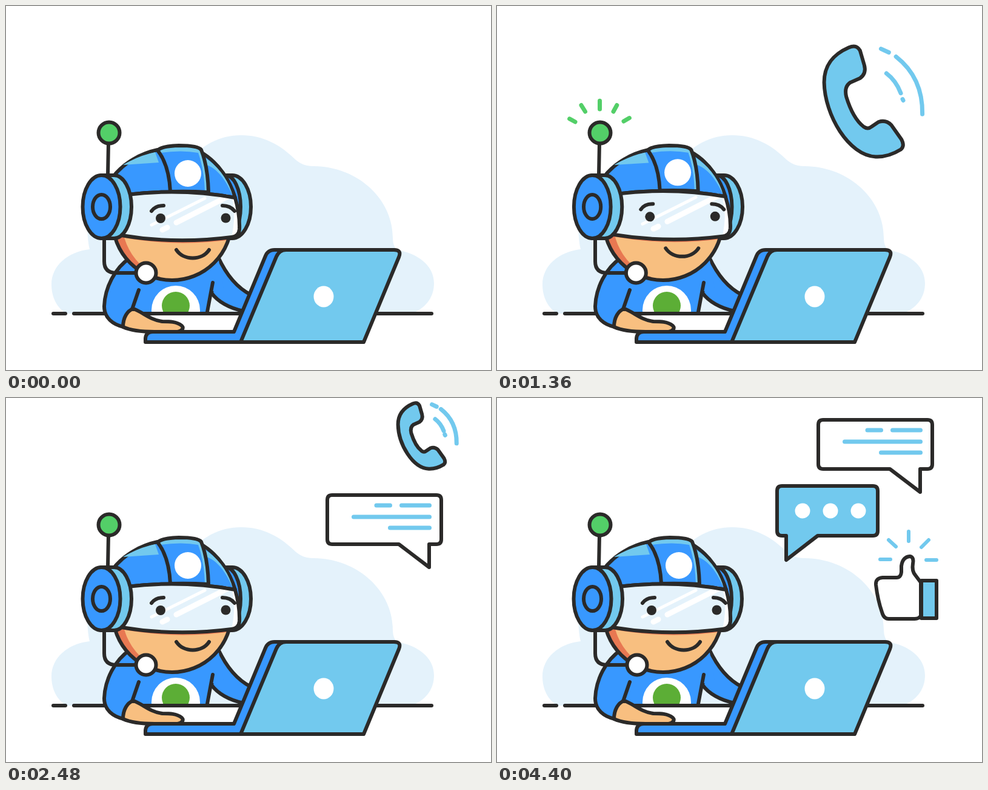
These frames come from a looping animation (800 px wide and 600 px high, 4.6 s). An HTML page:

```html
<!DOCTYPE html>
<html lang="en">
<head>
<meta charset="utf-8">
<title>Support call</title>
<style>
html, body { margin: 0; width: 100%; height: 100%; overflow: hidden; background: #fff; }
svg { display: block; width: 100%; height: 100%; }
.ink { stroke: #2b2a29; stroke-width: 6; stroke-linecap: round; stroke-linejoin: round; }
.none { fill: none; }
.white { fill: #fff; }
.blue { fill: #3898ff; }
.sky { fill: #72c9ee; }
.pale { fill: #e4f2fb; }
.skin { fill: #f8bf80; }
.shade { fill: #e87852; }
.dark { fill: #2b2a29; }
.green { fill: #53cf68; }
.line { fill: none; stroke: #72c9ee; stroke-width: 7; stroke-linecap: round; }
.shine { fill: none; stroke: #fff; stroke-linecap: round; }
#phone path { vector-effect: non-scaling-stroke; }
</style>
</head>
<body>
<svg viewBox="0 0 800 600">
  <defs>
    <clipPath id="faceClip"><circle cx="274" cy="354" r="98"/></clipPath>
    <clipPath id="deskClip"><path d="M200 440H360V504H200Z"/></clipPath>
  </defs>

  <path class="pale" d="M100 507C84 498 75 480 75 459C75 428 102 405 138 401C135 390 134 370 134 360C160 330 260 290 300 260C318 232 350 213 388 213C424 213 452 229 474 250C483 259 493 264 506 264C580 264 638 318 638 382Q638 396 645 402C680 408 706 428 706 457C706 482 690 500 668 507Z"/>
  <path class="ink none" d="M78 507H98M112 507H702"/>

  <g id="body">
    <path class="ink blue" d="M350 414C362 440 378 463 404 476L392 503C368 498 349 487 339 473Z"/>
    <path class="blue" d="M206 414H350L360 470L341 470L332 507H205Z"/>
    <path class="ink blue" d="M205 415C179 432 163 465 162 495C162 514 176 525 194 529L209 497L219 468"/>
    <path class="ink none" d="M341 456L332 504"/>
    <g clip-path="url(#deskClip)">
      <circle class="white" cx="280" cy="501" r="40"/>
      <circle cx="280" cy="494" r="23" fill="#5cae36"/>
    </g>
    <path class="white" d="M215 507H388L376 537H215Z"/>
    <path class="ink none" d="M222 507H388"/>
    <path class="ink skin" d="M210 499C200 502 193 514 193 529C206 535 225 537 245 537H283C290 536 294 531 290 527C281 520 270 520 258 520C238 518 225 504 210 499Z"/>
  </g>

  <g id="laptop">
    <path class="ink blue" d="M230 554V548Q231 537 242 537H376L428 412Q432 402 443 402H465L400 554Z"/>
    <path class="ink sky" d="M387 554L446 413Q451 402 462 402H640Q653 402 648 414L590 554Z"/>
    <ellipse class="white" cx="524" cy="479" rx="16.5" ry="17.5"/>
  </g>

  <g id="head">
    <path class="ink sky" d="M365 279H373A31 52 0 0 1 373 383H365Z" data-up="M365 279H383A29 52 0 0 1 383 383H365Z"/>
    <path class="ink blue" d="M362 279A25 52 0 0 1 362 383Z" data-up="M364 279A27 52 0 0 1 364 383Z"/>
    <circle class="shade" cx="274" cy="354" r="98"/>
    <g clip-path="url(#faceClip)">
      <circle class="skin" cx="290" cy="355" r="98.5"/>
      <path class="shade" d="M190 381Q280 398 372 385L372 360L190 360Z" data-up="M190 370Q280 384 369 376L369 350L190 350Z"/>
    </g>
    <circle class="ink none" cx="274" cy="354" r="98"/>

    <path class="ink blue" d="M176 282C195 258 222 243 250 237L320 240C352 258 370 290 378 316Q290 300 200 311Z" data-up="M176 282C193 260 218 246 242 239L312 240C345 255 362 275 370 301Q280 287 190 300Z"/>
    <path class="sky" d="M193 262Q220 246 246 241L252 258Z" data-up="M195 262Q215 249 232 244L239 262Z"/>
    <path class="sky" d="M328 250C352 265 368 290 374 313C362 285 348 268 331 262Z" data-up="M314 243C343 256 360 276 366 298C355 280 335 262 316 258Z"/>
    <path class="sky" d="M250 238Q256 231 285 230Q317 230 322 237Q333 265 334 307Q302 305 271 306Q269 262 250 238Z" data-up="M240 236Q246 230 275 230Q304 230 309 238Q317 262 316 293Q284 292 253 293Q252 258 240 236Z"/>
    <path class="blue" d="M254 242Q290 237 317 242Q327 270 328 306Q300 304 271 306Q268 262 254 242Z" data-up="M244 241Q280 235 305 241Q311 262 311 293Q284 292 253 293Q252 258 244 241Z"/>
    <path class="ink none" d="M250 238Q256 231 285 230Q317 230 322 237Q333 265 334 307Q302 305 271 306Q269 262 250 238Z" data-up="M240 236Q246 230 275 230Q304 230 309 238Q317 262 316 293Q284 292 253 293Q252 258 240 236Z"/>
    <g id="badge"><circle class="white" cx="300" cy="276" r="22"/></g>

    <path class="pale" d="M200 311Q290 300 378 316Q386 345 385 368Q384 380 372 381Q280 393 190 378Z" data-up="M190 300Q280 287 368 300Q385 330 384 356Q383 370 369 371Q280 379 190 366Z"/>
    <path class="white" d="M373 318L378 316Q386 345 385 368Q384 380 372 381Q380 345 373 318Z" data-up="M361 301L368 300Q385 330 384 356Q383 370 369 371Q380 335 361 301Z"/>
    <g id="shine">
      <path class="shine" stroke-width="5" d="M240 361L328 317"/>
      <path class="shine" stroke-width="9" d="M281 357L364 315M258 369L266 365"/>
    </g>
    <path class="ink none" d="M200 311Q290 300 378 316Q386 345 385 368Q384 380 372 381Q280 393 190 378Z" data-up="M190 300Q280 287 368 300Q385 330 384 356Q383 370 369 371Q280 379 190 366Z"/>

    <g id="face">
      <circle class="dark" cx="255" cy="350" r="8"/>
      <circle class="dark" cx="362.5" cy="349.5" r="8"/>
      <path class="ink none" d="M240 338Q246 329 260 329M357 329Q370 329 377 338"/>
      <path id="mouth" class="ink white"/>
    </g>

    <path class="ink none" d="M169 224L168 278"/>
    <g id="rays" fill="none" stroke="#53cf68" stroke-width="7" stroke-linecap="round"></g>
    <circle class="ink green" cx="170" cy="209" r="17.5"/>

    <path class="ink none" d="M162 383V421Q162 440 182 440H215"/>
    <g id="mic"><circle class="ink white" cx="231" cy="440" r="16.5"/></g>
    <path class="ink sky" d="M157 279H178A29 52 0 0 1 178 383H157Z" data-up="M155 279H175A26 52 0 0 1 175 383H155Z"/>
    <path class="ink blue" d="M157.5 279A31 52 0 0 1 157.5 383A31 52 0 0 1 157.5 279Z" data-up="M155.5 279A26 52 0 0 1 155.5 383A26 52 0 0 1 155.5 279Z"/>
    <path class="ink none" d="M157.5 311A14.5 20 0 0 1 157.5 351A14.5 20 0 0 1 157.5 311Z" data-up="M154.5 311A11.5 20 0 0 1 154.5 351A11.5 20 0 0 1 154.5 311Z"/>
  </g>

  <g id="phone">
    <path class="ink sky" d="M-25 -90Q-12 -96 -6 -85L1 -61Q5 -47 -6 -39L-22 -32Q-33 -25 -29 -8Q-18 28 0 42Q7 47 13 42L25 34Q37 30 46 39L63 63Q69 74 62 80Q41 93 20 92C-25 90 -65 23 -66 -32C-66 -62 -50 -79 -25 -90Z"/>
    <g id="waves">
      <path class="line" d="M29 -88L42 -82M54 -75Q99 -40 98 21M38 -47Q54 -35 62 -14M65 -4L66 -2"/>
    </g>
  </g>

  <g id="note">
    <path class="ink white" d="M538 255H710Q718 255 718 263V328Q718 336 710 336H698V374L648 336H538Q530 336 530 328V263Q530 255 538 255Z"/>
    <g id="text"><path class="line" d="M611 272H633.5M652.5 272H698.5M573.5 291H698.5M633.5 309H698.5"/></g>
  </g>

  <g id="reply">
    <path class="ink sky" d="M470 269H620Q628 269 628 277V343Q628 351 620 351H529L477 391V351H470Q462 351 462 343V277Q462 269 470 269Z"/>
    <g id="dots" class="white">
      <circle cx="504" cy="310"/><circle cx="550" cy="310"/><circle cx="596" cy="310"/>
    </g>
  </g>

  <g id="thumb">
    <path class="ink sky" d="M700 301H725V363H700Z"/>
    <path class="ink white" d="M636 296H659Q666 296 667 287V277Q669 262 681 261Q688 262 686 273Q684 285 690 292L699 304V359Q696 364 689 364H646Q638 364 635 353Q628 333 625 308Q624 297 636 296Z"/>
  </g>
  <g id="sparks" class="line" style="stroke-width:6"></g>
</svg>

<script>
const LOOP = 4600;
const $ = id => document.getElementById(id);
const clamp = x => Math.max(0, Math.min(1, x));
const span = (t, a, b) => clamp((t - a) / (b - a));
const ease = (t, a, b) => { const x = span(t, a, b); return x * x * (3 - 2 * x); };
const lerp = (a, b, k) => a + (b - a) * k;
const wave = (t, start, period) => Math.sin(2 * Math.PI * (t - start) / period);

// Blend two paths that share the same commands; arc flags must stay plain 0 or 1
function blend(a, b, k) {
  const to = b.match(/-?[\d.]+/g);
  let i = 0;
  return a.replace(/-?[\d.]+/g, n => +lerp(+n, +to[i++], k).toFixed(2));
}

function move(id, x, y) { $(id).setAttribute('transform', `translate(${x} ${y})`); }

function pop(id, s, x, y, dy = 0) {
  const el = $(id);
  el.style.display = s > 0.01 ? '' : 'none';
  el.setAttribute('transform', `translate(${x} ${y + dy}) scale(${s}) translate(${-x} ${-y})`);
}

// Rays are [x, y, dx, dy] from the inner end outwards
function drawRays(id, rays, k) {
  $(id).innerHTML = k < 0.02 ? '' : `<path d="${rays.map(([x, y, dx, dy]) =>
    `M${x} ${y}l${dx * k} ${dy * k}`).join('')}"/>`;
}

const SIGNAL = [[129, 191, -13, -7], [145.5, 174, -9, -14.5], [169.5, 170, 0, -19],
  [192, 174, 8, -14.5], [209, 190, 13, -7.5]];
const SPARKS = [[649, 266, -17, 0], [658, 245, -12, -11], [679, 236, 0, -16],
  [700, 246, 12, -12], [708, 267, 17, 0]];
const SMILE = 'M281 402C293 420 323 420 335 402C323 420 293 420 281 402Z';
const OPEN = 'M289 402C290 428 325 428 326 401C315 396 300 398 289 402Z';

const parts = [...document.querySelectorAll('[data-up]')].map(el =>
  ({ el, down: el.getAttribute('d'), up: el.dataset.up }));
const dots = [...$('dots').children];

function drawHead(t) {
  const k = ease(t, 190, 500) - ease(t, 1120, 1430);
  for (const p of parts) p.el.setAttribute('d', blend(p.down, p.up, k));
  move('face', -21.5 * k, -21 * k);
  move('badge', -15 * k, -13 * k);
  move('shine', 0, -13 * k);
  move('mic', -13 * k, 0);

  const talk = ease(t, 2475, 2640) - ease(t, 3385, 3560);
  $('mouth').setAttribute('d', blend(SMILE, OPEN, talk * (1 + 0.12 * wave(t, 3000, 320))));

  const ringing = t > 358 && t < 1590;
  drawRays('rays', SIGNAL, ringing ? Math.abs(wave(t, 358, 616)) : 0);
}

function drawPhone(t, lift) {
  const size = ease(t, 50, 330) * lerp(0.99, 0.53, ease(t, 1240, 1640)) / 0.9;
  const x = lerp(601, 685.5, ease(t, 1320, 1640));
  const turn = t > 307 && t < 1231 ? -9.6 * wave(t, 923, 308) : 0;
  const pulse = t > 538 && t < 1154 ? 1 - 0.24 * wave(t, 538, 616) ** 2 : 1;
  $('phone').style.display = size > 0.01 ? '' : 'none';
  $('phone').setAttribute('transform', `translate(${x} ${157.5 + lift}) rotate(${turn}) scale(${size})`);
  $('waves').setAttribute('transform', `scale(${pulse})`);
}

function draw(t) {
  const first = -95 * ease(t, 2145, 2475);
  const second = -124 * ease(t, 3385, 3715);
  drawHead(t);
  drawPhone(t, first + second);

  pop('note', ease(t, 1700, 1980), 698, 374, first + second);
  const w = ease(t, 1960, 2220);
  $('text').style.display = w > 0.01 ? '' : 'none';
  $('text').setAttribute('transform', `translate(702 0) scale(${w} 1) translate(-702 0)`);

  pop('reply', ease(t, 2475, 2780), 477, 391, second);
  dots.forEach((d, i) => d.setAttribute('r', 12.5 * ease(t, 2780 + i * 135, 2980 + i * 135)));

  const grow = ease(t, 3715, 3950) * 1.025 - 0.025 * ease(t, 3950, 4040);
  pop('thumb', grow, 675, 313);
  drawRays('sparks', SPARKS, ease(t, 4170, 4400));
}

const start = performance.now();
function tick() {
  draw((performance.now() - start) % LOOP);
  requestAnimationFrame(tick);
}
tick();
</script>
</body>
</html>
```
